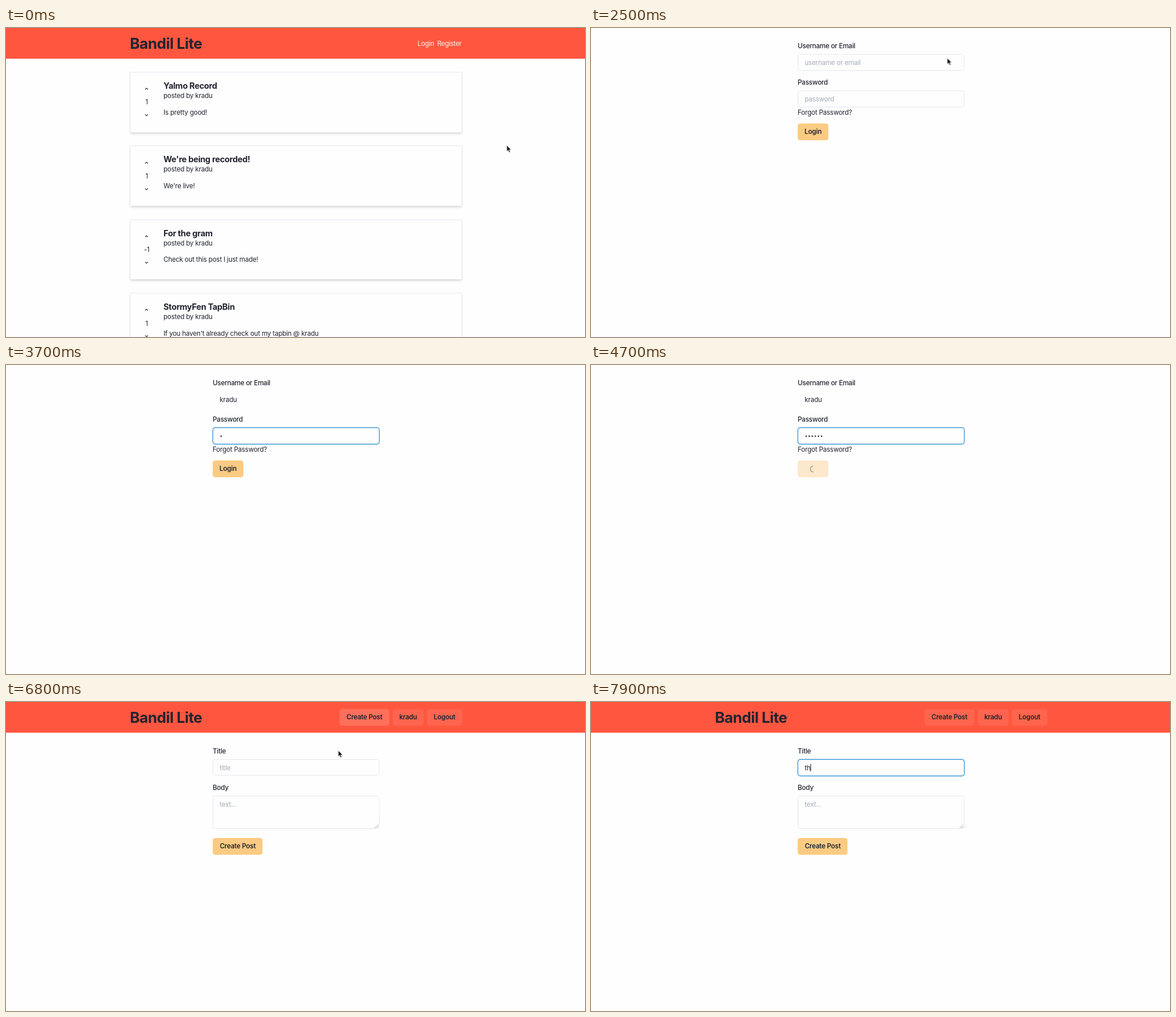
Write an HTML page that moves like this. It is 1000x534 px and loops after 8 s.

```html
<!DOCTYPE html>
<html lang="en">
<head>
<meta charset="utf-8">
<title>Forum demo</title>
<style>
html, body { margin: 0; width: 100%; height: 100%; overflow: hidden; background: #fefefe; }
#stage { position: absolute; left: 0; top: 0; width: 1000px; height: 534px; overflow: hidden;
  font: 400 11.48px/20px Inter, sans-serif; letter-spacing: -.019em; color: #20242f; }
#stage div, #stage p, #stage svg { position: absolute; box-sizing: border-box; margin: 0; }
#stage p { white-space: pre; margin-top: -10px; }
#stage .win { inset: 0; animation: 8s step-end infinite; }
#stage .mid { width: 40px; margin-left: -20px; text-align: center; }
.bar { left: 0; top: 0; width: 1000px; height: 53px; background: #ff573f; }
.brand { font-size: 25.8px; font-weight: 700; letter-spacing: -.021em; }
.head { font-size: 14.35px; font-weight: 700; letter-spacing: -.021em; }
.link { color: #fff3f0; letter-spacing: -.024em; }
.under { text-decoration: underline; }
.label { font-weight: 500; }
.hint { color: #a4acb9; }
.card { border: 1px solid #e6e9ef;
  box-shadow: 0 3px 4px -1px rgba(0,0,0,.13), 0 1px 3px -1px rgba(0,0,0,.08); }
.btn { border-radius: 4.3px; font-weight: 600; text-align: center; line-height: 28.7px; }
.nav { background: rgba(255,255,255,.08); }
.gold { background: #fbcb83; }
.busy { opacity: .42; }
.up { background: #76dfd0; }
.down { background: #fba5a5; }
.field { left: 357px; width: 287.5px; border: 1px solid #e4e8ef; border-radius: 4.3px; background: #fefefe; }
.focus { border: 1.4px solid #449bd6; box-shadow: 0 0 0 .4px #449bd6; }
.caret { display: inline-block; width: 1px; height: 13px; background: #20242f; vertical-align: -2.5px; }
.drop { background: #252528; border-radius: 0 0 3px 3px; box-shadow: 0 1px 2px rgba(0,0,0,.35); }
.drop p { color: #f4f4f5; font-size: 9.4px; font-weight: 600; letter-spacing: 0; }
.ico { fill: none; stroke: #20242f; stroke-width: 2.2; stroke-linecap: round; stroke-linejoin: round; }
.arrow { overflow: visible; left: 0; top: 0; animation: move 8s ease-in-out infinite; filter: drop-shadow(0 .6px .6px rgba(0,0,0,.3)); }
.spin { animation: spin 8s linear infinite; }
@keyframes spin {
  0%, 57.5% { transform: rotate(-80deg); }
  63.75%, 100% { transform: rotate(320deg); }
}
@keyframes move {
  0%, 1.25% { transform: translate(865px, 203px); }
  11.25% { transform: translate(738px, 54px); }
  16.25%, 27.5% { transform: translate(722px, 26px); }
  32.5%, 67.5% { transform: translate(600px, 56px); }
  72.5% { transform: translate(671px, 87px); }
  78.75%, 82% { transform: translate(622px, 30px); }
  85%, 86% { transform: translate(574px, 84px); }
  91.25%, 100% { transform: translate(520px, 110px); }
}
</style>
</head>
<body>
<div id="stage"></div>
<script>
let rules = '';
const user = 'kradu';
const mail = 'kestun.o@mail.example';
const posts = [
  ['Yalmo Record', 'Is pretty good!', 1],
  ["We're being recorded!", "We're live!", 1],
  ['For the gram', 'Check out this post I just made!', -1],
  ['StormyFen TapBin', `If you haven't already check out my tapbin @ ${user}`, 1]
];

const text = (x, y, s, cls = '') => `<p class="${cls}" style="left:${x}px;top:${y}px">${s}</p>`;
const box = (x, y, w, h, cls, s = '') =>
  `<div class="${cls}" style="left:${x}px;top:${y}px;width:${w}px;height:${h}px">${s}</div>`;
const button = (x, y, w, cls, s = '') => box(x, y, w, 28.7, 'btn ' + cls, s);
const field = (y, h, cls = '') => `<div class="field ${cls}" style="top:${y}px;height:${h}px"></div>`;
const icon = (x, y, d) =>
  `<svg class="ico" style="left:${x - 5.75}px;top:${y - 5.75}px" width="11.5" height="11.5" viewBox="0 0 24 24"><path d="${d}"/></svg>`;

// Shows its content from a to b (ms) of the loop.
function win(a, b, html) {
  const name = `w${a}-${b}`;
  const at = ms => Math.max(0, ms - 20) / 80;
  rules += `@keyframes ${name}{0%{opacity:${a ? 0 : 1}}${at(a)}%{opacity:1}${b < 8000 ? at(b) : 100}%{opacity:0}100%{opacity:0}}`;
  return `<div class="win" style="animation-name:${name}">${html}</div>`;
}

const chevron = (y, dir) => icon(243, y, dir > 0 ? 'M7.5 14.5 12 10l4.5 4.5' : 'M7.5 9.5 12 14l4.5-4.5');
const pencil = y => icon(758, y,
  'M11 4H4a2 2 0 0 0-2 2v14a2 2 0 0 0 2 2h14a2 2 0 0 0 2-2v-7M18.5 2.5a2.1 2.1 0 0 1 3 3L12 15l-4 1 1-4z');
const trash = y => `<svg style="left:752.5px;top:${y - 6}px" width="11" height="12" viewBox="0 0 11 12">
  <path fill="#20242f" d="M.8 1.7h2.6L4 .6h3l.6 1.1h2.6v1.2H.8zM1.5 3.5h8l-.5 7.1q-.1 1-1 1H3q-.9 0-1-1z"/>
  <path stroke="#fefefe" stroke-width=".7" d="M3.7 5v5M5.5 5v5M7.3 5v5"/></svg>`;

function card([title, body, score], i, member) {
  const y = 76 + i * (member ? 144.6 : 127.4);
  const mid = y + (member ? 61 : 52);
  const vote = !member ? '' : score > 0
    ? button(228.8, y + 23.5, 28.7, 'up') : button(228.8, y + 69.5, 28.7, 'down');
  return box(214, y, 574, member ? 121.6 : 104.6, 'card') + vote +
    chevron(mid - 23.1, 1) + text(243, mid + .3, score, 'mid') + chevron(mid + 23, -1) +
    text(272, y + 23.7, title, 'head') + text(272, y + 41, 'posted by ' + user) +
    text(272, y + (member ? 84 : 69.6), body) +
    (member ? pencil(y + 63.7) + trash(y + 92.4) : '');
}

const list = member => posts.map((p, i) => card(p, i, member)).join('');
const header = '<div class="bar"></div>' + text(214, 26.8, 'Bandil Lite', 'brand');
const memberHeader = header +
  win(6200, 6900, button(576, 12, 86, 'nav')) +
  button(576, 12, 86, 'nav', 'Create Post') +
  button(668, 12, 53, 'nav', user) +
  button(727, 12, 61, 'nav', 'Logout');

const drop = (y, rows) => box(357, y, 287, 10.5 + rows.length * 26, 'drop',
  rows.map((s, i) => text(9, 19 + i * 26, s)).join(''));

// Types a word with a caret, which leaves `step` ms after the last letter.
const caret = '<span class="caret"></span>';
const typing = (y, word, start, step) => [...word].map((_, i) =>
  win(start + i * step, start + (i + 1) * step, text(369, y, word.slice(0, i + 1) + caret))).join('');

const dots = n => `<svg width="1000" height="534" style="left:0;top:0" fill="#20242f">${
  Array.from({ length: n }, (_, i) => `<circle cx="${371.6 + i * 5.3}" cy="123" r="1.25"/>`).join('')}</svg>`;
const password = [1, 2, 3, 4, 5, 6].map(n =>
  win(3600 + n * 100, n < 6 ? 3700 + n * 100 : 5100, dots(n))).join('');

const spinner = box(377.5, 174.2, 11.5, 11.5, 'busy',
  `<svg class="spin" width="11.5" height="11.5"><path d="M5.75 .7A5.05 5.05 0 0 0 5.75 10.8" fill="none" stroke="#20242f" stroke-width="1.3"/></svg>`);

const login = text(357, 31, 'Username or Email', 'label') +
  win(1900, 2700, field(45, 28.7) + text(369, 59.5, 'username or email', 'hint')) +
  win(2700, 3600, field(44.8, 29.2, 'focus')) +
  win(2700, 3100, text(369, 59.5, caret)) +
  typing(59.5, user, 3100, 100) +
  win(3600, 5100, text(369, 59.5, user)) +
  text(357, 94, 'Password', 'label') +
  win(1900, 3600, field(108, 28.7) + text(369, 122.5, 'password', 'hint')) +
  win(3600, 5100, field(107.8, 29.2, 'focus')) + password +
  text(357, 145.6, 'Forgot Password?') +
  win(1900, 4300, button(357, 165.3, 53, 'gold', 'Login')) +
  win(4300, 5100, button(357, 165.3, 53, 'gold busy') + spinner) +
  win(2700, 3100, drop(74, [user, user + '2', mail, 'guest', 'test'])) +
  win(3100, 3200, drop(74, [user, user + '2', mail])) +
  win(3200, 3500, drop(74, [user, user + '2']));

const create = memberHeader +
  text(357, 85, 'Title', 'label') +
  win(6600, 7500, field(98.8, 28.7)) +
  win(7500, 8000, field(98.5, 29.2, 'focus')) +
  win(6600, 7700, text(369, 113.5, 'title', 'hint')) +
  typing(113.5, 'th', 7700, 150) +
  text(357, 148, 'Body', 'label') + field(162, 57.2) + text(369, 176.5, 'text...', 'hint') +
  '<svg width="8" height="8" style="left:636px;top:211px" stroke="#8b8f97" stroke-width=".8"><path d="M1 7 7 1M4.5 7 7 4.5"/></svg>' +
  button(357, 235, 86.4, 'gold', 'Create Post') +
  win(7500, 7700, drop(128, [...posts.map(p => p[0]), 'First post', 'Hello']));

const arrow = `<svg class="arrow" width="8" height="13"><path d="M0 0V10.2L2.3 8.1 4 12 5.7 11.3 4.1 7.5H7.2Z"
  fill="#111" stroke="#fff" stroke-width=".6"/></svg>`;

document.getElementById('stage').innerHTML =
  win(0, 1900, header + list(false) + text(744.7, 27, 'Register', 'link') +
    win(0, 1200, text(710.7, 27, 'Login', 'link')) +
    win(1200, 1900, text(710.7, 27, 'Login', 'link under'))) +
  win(1900, 5100, login) +
  win(5100, 6600, memberHeader + list(true)) +
  win(6600, 8000, create) +
  win(0, 3100, arrow) + win(5500, 7700, arrow);
const sheet = document.createElement('style');
sheet.textContent = rules;
document.head.append(sheet);
</script>
</body>
</html>
```
